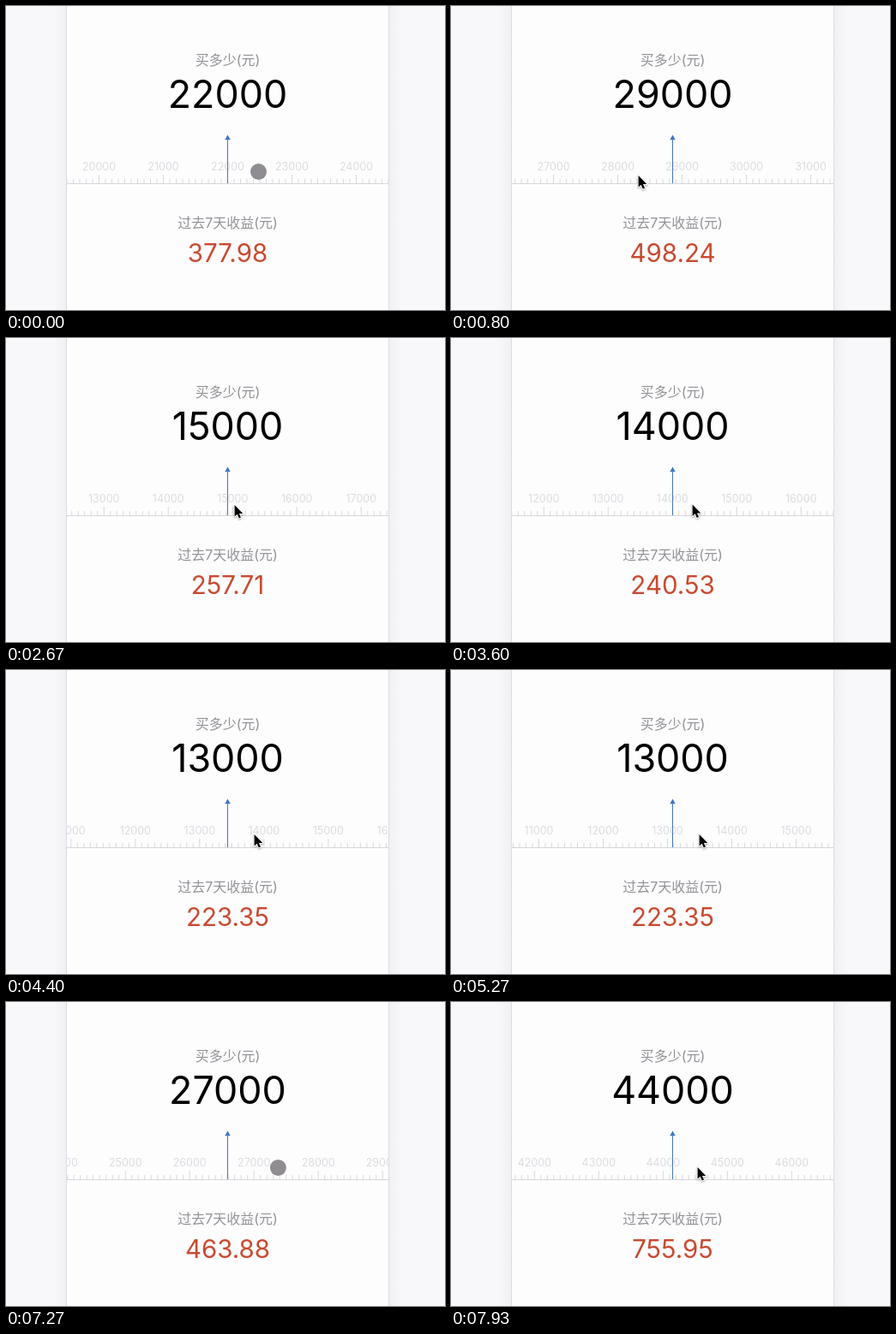
An HTML page with a canvas that plays this animation: 512 px wide and 355 px high, repeating every 8 s.

```html
<!DOCTYPE html>
<html lang="zh">
<head>
<meta charset="utf-8">
<style>
html, body { margin: 0; width: 100%; height: 100%; overflow: hidden; background: #f8f7fa; }
canvas { display: block; width: 512px; height: 355px; }
</style>
</head>
<body>
<canvas id="stage"></canvas>
<script>
const W = 512, H = 355, LOOP = 8000, STEP = 1000 / 15;
const LEFT = 71, RIGHT = 446, MID = 258.5, BASE = 207;
const PX_PER_UNIT = 0.075, RATE = 0.0171807;
const FONT = 'Inter, "Noto Sans CJK SC", "Noto Sans CJK", sans-serif';

const canvas = document.getElementById('stage');
const ctx = canvas.getContext('2d');
const dpr = window.devicePixelRatio || 1;
canvas.width = W * dpr;
canvas.height = H * dpr;
ctx.scale(dpr, dpr);

// A drag from (x0, y0) to (x1, y1), then a glide from v1 towards v2.
const flicks = [
  { start: 330, end: 530, x0: 294, y0: 193, x1: 219, y1: 198, v0: 22000, v1: 23000, v2: 30900, tau: 200 },
  { start: 2060, end: 2200, x0: 219, y0: 198, x1: 267, y1: 195, v0: 30900, v1: 30260, v2: 14000, tau: 162.7 },
  { start: 3860, end: 4130, x0: 282, y0: 194.5, x1: 290, y1: 192, v0: 14000, v1: 13450, v2: 13450, tau: 200 },
  { start: 5330, end: 5560, x0: 290, y0: 192, x1: 279, y1: 197, v0: 13080, v1: 13230, v2: 26490, tau: 230 },
  { start: 7200, end: 7350, x0: 340, y0: 193, x1: 288, y1: 193, v0: 26490, v1: 27000, v2: 45130, tau: 200 }
];

const clamp = u => Math.max(0, Math.min(1, u));
const lerp = (a, b, u) => a + (b - a) * u;
const smooth = u => u * u * (3 - 2 * u);

function pose(t) {
  const i = flicks.findLastIndex(f => t >= f.start);
  if (i < 0) return { value: 22000, x: 294, y: 193, pressed: t < 125 };
  const f = flicks[i], next = flicks[i + 1];
  if (t < f.end) {
    const u = (t - f.start) / (f.end - f.start);
    return {
      value: lerp(f.v0, f.v1, u * u),
      x: lerp(f.x0, f.x1, u),
      y: lerp(f.y0, f.y1, u),
      pressed: true
    };
  }
  let value = lerp(f.v2, f.v1, Math.exp(-(t - f.end) / f.tau));
  // The ruler creeps on after the short third drag.
  if (i === 2) value = lerp(f.v2, next.v0, smooth(clamp((t - 4300) / 850)));
  const back = next ? smooth(clamp((t - next.start + 650) / 350)) : 0;
  return {
    value,
    x: next ? lerp(f.x1, next.x0, back) : f.x1,
    y: next ? lerp(f.y1, next.y0, back) : f.y1,
    pressed: false
  };
}

function text(str, x, y, size, color) {
  ctx.font = `400 ${size}px ${FONT}`;
  ctx.textAlign = 'center';
  ctx.fillStyle = color;
  ctx.fillText(str, x, y);
}

function rect(x, y, w, h, color) {
  ctx.fillStyle = color;
  ctx.fillRect(x, y, w, h);
}

function shade(from, to) {
  const g = ctx.createLinearGradient(from, 0, to, 0);
  g.addColorStop(0, 'rgba(70,65,85,0.045)');
  g.addColorStop(1, 'rgba(70,65,85,0)');
  rect(Math.min(from, to), 0, Math.abs(to - from), H, g);
}

function card() {
  rect(0, 0, W, H, '#f8f7fa');
  shade(LEFT, LEFT - 16);
  shade(RIGHT, RIGHT + 16);
  rect(LEFT, 0, RIGHT - LEFT, H, '#fefdfe');
  rect(LEFT - 1, 0, 1, H, '#dddce0');
  rect(RIGHT, 0, 1, H, '#dddce0');
}

function ruler(value) {
  ctx.save();
  ctx.beginPath();
  ctx.rect(LEFT, 140, RIGHT - LEFT, 80);
  ctx.clip();
  const first = Math.floor((value - 3100) / 100) * 100;
  for (let n = first; n < value + 3100; n += 100) {
    const x = MID + (n - value) * PX_PER_UNIT;
    const major = n % 1000 === 0;
    const h = major ? 10 : 5;
    rect(x - 0.5, BASE - h, 1, h, '#d8d7db');
    if (major) text(n, x, 192, 12.5, '#dcdbdf');
  }
  rect(LEFT, BASE, RIGHT - LEFT, 1, '#d6d5d9');
  ctx.restore();
}

function needle() {
  rect(258, 154, 1, 53, '#3f77c2');
  ctx.beginPath();
  ctx.moveTo(MID, 150.5);
  ctx.lineTo(MID + 3.3, 156.3);
  ctx.lineTo(MID - 3.3, 156.3);
  ctx.fill();
}

const arrow = [[0, 0], [0, 13.6], [3.1, 10.8], [5.2, 15.6], [7.4, 14.6], [5.3, 9.9], [9.7, 9.9]];

function pointer({ x, y, pressed }) {
  ctx.beginPath();
  if (pressed) {
    ctx.arc(x + 0.5, y + 0.5, 9.5, 0, Math.PI * 2);
    ctx.fillStyle = '#8f8d91';
    ctx.fill();
    return;
  }
  arrow.forEach(([dx, dy]) => ctx.lineTo(x + dx - 0.4, y + dy));
  ctx.closePath();
  ctx.save();
  ctx.shadowColor = 'rgba(0,0,0,0.35)';
  ctx.shadowBlur = 2 * dpr;
  ctx.shadowOffsetY = dpr;
  ctx.lineWidth = 2;
  ctx.lineJoin = 'round';
  ctx.strokeStyle = '#fff';
  ctx.stroke();
  ctx.restore();
  ctx.fillStyle = '#000';
  ctx.fill();
}

function draw(t) {
  const p = pose(t);
  const amount = Math.round(p.value / 1000) * 1000;
  card();
  text('买多少(元)', MID, 69, 16, '#929196');
  text(amount, MID, 118.5, 44.8, '#000');
  ruler(p.value);
  needle();
  text('过去7天收益(元)', MID, 259, 16, '#929196');
  text((amount * RATE).toFixed(2), MID, 298.5, 29.5, '#c84a30');
  pointer(p);
}

const origin = performance.now();

function tick() {
  const t = (performance.now() - origin) % LOOP;
  // The picture advances fifteen times a second.
  draw(Math.floor((t + 4) / STEP) % 120 * STEP);
  requestAnimationFrame(tick);
}
tick();
</script>
</body>
</html>
```
